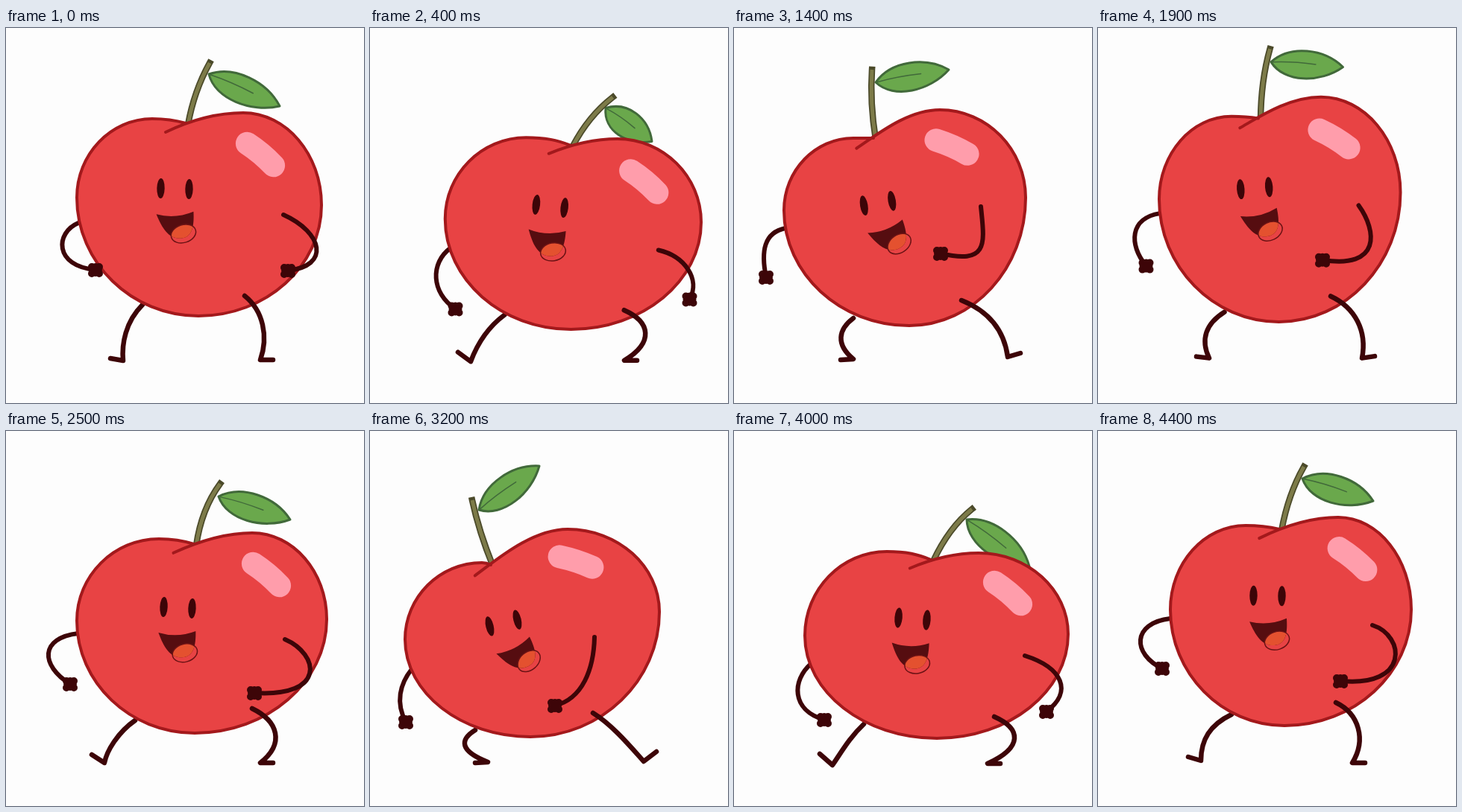
Recreate the animation shown at these times as an HTML page with a canvas. Size 480 px wide and 504 px high, loop 4500 ms.

```html
<!DOCTYPE html>
<html lang="en">
<head>
<meta charset="utf-8">
<title>Dancing apple</title>
<style>
html, body { margin: 0; width: 100%; height: 100%; overflow: hidden; background: #fdfdfd; }
canvas { display: block; width: 480px; height: 504px; }
</style>
</head>
<body>
<canvas id="stage" width="480" height="504"></canvas>
<script>
const ctx = document.getElementById('stage').getContext('2d');
const LOOP = 4500, STEP = 100;
const RED = '#e84344', EDGE = '#a3191c', LIMB = '#3d0508';

// body: notch, left top, left, bottom, right, right top
// stem: bend, tip; leaf: base, tip; face: eye centre and tilt in degrees
// limbs: bezier from body outwards; toes: lift of each toe
const hips = {
  body: [241,128, 196,122, 95,228, 258,387, 423,238, 318,114],
  stem: [252,85, 273,47], leaf: [272,62, 367,105], shine: [341,170], face: [226.5,216, 0],
  armL: [97,262, 66,275, 64,320, 120,325], armR: [372,251, 425,275, 435,320, 378,326],
  legL: [183,372, 160,395, 155,425, 157,447], legR: [320,360, 345,380, 352,415, 341,446], toes: [3, 0]
};
const farRight = {
  body: [277,166, 213,154, 102,262, 276,408, 452,268, 335,160],
  stem: [305,130, 342,108], leaf: [330,122, 381,172], shine: [376,218], face: [246.5,245.5, 10],
  armL: [112,310, 92,335, 94,375, 124,397], armR: [393,311, 425,317, 452,335, 463,374],
  legL: [181,387, 160,405, 145,430, 134,450], legR: [348,384, 385,400, 388,425, 341,447], toes: [15, 0]
};
const right = {
  body: [264,173, 205,162, 95,275, 272,413, 448,273, 328,164],
  stem: [288,130, 319,105], leaf: [312,119, 396,182], shine: [367,218], face: [239.5,252.5, 5],
  armL: [103,313, 78,335, 76,375, 121,388], armR: [390,302, 440,318, 455,350, 419,377],
  legL: [174,394, 155,412, 145,430, 132,449], legR: [349,384, 385,400, 388,425, 340,447], toes: [15, 0]
};
const lowBounce = {
  body: [252,152, 205,145, 95,255, 253,406, 430,253, 330,137],
  stem: [262,105, 287,71], leaf: [285,88, 381,119], shine: [349,193], face: [230.5,237.5, 2],
  armL: [97,272, 45,278, 46,315, 86,340], armR: [374,280, 420,300, 430,358, 333,352],
  legL: [173,389, 150,405, 135,430, 132,446], legR: [330,373, 365,390, 374,420, 341,446], toes: [11, 0]
};
const highBounce = {
  body: [243,132, 198,127, 97,240, 250,396, 420,240, 322,116],
  stem: [255,85, 276,48], leaf: [274,64, 369,94], shine: [341,172], face: [227.5,221.5, -1],
  armL: [97,252, 45,258, 46,300, 86,319], armR: [368,261, 412,275, 418,345, 325,336],
  legL: [179,381, 150,395, 138,415, 138,443], legR: [319,365, 350,380, 360,415, 341,446], toes: [5, 0]
};
const left = {
  body: [162,180, 150,177, 47,280, 215,411, 388,243, 265,132],
  stem: [146,135, 137,93], leaf: [146,106, 227,47], shine: [276,176], face: [179,258, -23],
  armL: [56,320, 40,340, 34,365, 48,391], armR: [301,277, 300,320, 285,360, 248,369],
  legL: [141,402, 120,415, 120,430, 158,445], legR: [299,379, 325,395, 350,425, 367,444], toes: [-1, 13]
};
const leftBounce = {
  body: [187,148, 160,148, 67,245, 235,400, 391,228, 276,110],
  stem: [182,100, 185,56], leaf: [190,73, 288,56], shine: [292,160], face: [193,235.5, -17],
  armL: [69,269, 40,275, 36,300, 43,335], armR: [331,240, 336,290, 342,318, 277,303],
  legL: [160,390, 140,405, 136,425, 160,445], legR: [305,366, 340,380, 362,405, 367,442], toes: [-1, 5]
};

function mix(a, b, k) {
  const out = {};
  for (const part in a) out[part] = a[part].map((v, i) => v + (b[part][i] - v) * k);
  return out;
}

// lengthen a pose upwards from the ground
function stretch(pose, k) {
  const out = {};
  for (const part in pose)
    out[part] = part === 'toes' ? pose[part] : pose[part].map((v, i) => i % 2 ? 450 + (v - 450) * k : v);
  return out;
}

const tall = stretch(mix(leftBounce, highBounce, 0.5), 1.06);

const keys = [
  [0, hips], [200, right], [300, farRight], [600, highBounce], [800, farRight], [1050, hips],
  [1300, left], [1400, leftBounce], [1500, leftBounce], [1700, left],
  [1900, tall], [2100, right], [2200, farRight], [2500, lowBounce], [2700, farRight], [2950, hips],
  [3200, left], [3300, leftBounce], [3400, leftBounce], [3600, left],
  [3800, tall], [4000, right], [4100, farRight], [4400, highBounce]
];

function poseAt(t) {
  let i = keys.findIndex(k => k[0] > t);
  if (i < 0) return keys[keys.length - 1][1];
  const [t0, a] = keys[i - 1], [t1, b] = keys[i];
  return mix(a, b, (1 - Math.cos(Math.PI * (t - t0) / (t1 - t0))) / 2);
}

function stroke(color, width, cap = 'round') {
  ctx.strokeStyle = color;
  ctx.lineWidth = width;
  ctx.lineCap = cap;
  ctx.lineJoin = 'round';
  ctx.stroke();
}

function fill(color) {
  ctx.fillStyle = color;
  ctx.fill();
}

function curve([x, y, ...rest]) {
  ctx.beginPath();
  ctx.moveTo(x, y);
  ctx.bezierCurveTo(...rest);
}

function hand(x, y) {
  ctx.beginPath();
  for (const [dx, dy, r] of [[0, 0, 9], [-5, -4, 5], [5, -4, 5], [-5, 5, 5], [5, 5, 5]]) {
    ctx.moveTo(x + dx + r, y + dy);
    ctx.arc(x + dx, y + dy, r, 0, 7);
  }
  fill(LIMB);
}

function leg(points, side, lift) {
  curve(points);
  ctx.lineTo(points[6] + 17 * side, points[7] - lift);
  stroke(LIMB, 6.5);
}

function leaf([x, y, tx, ty]) {
  const len = Math.hypot(tx - x, ty - y);
  ctx.save();
  ctx.translate(x, y);
  ctx.rotate(Math.atan2(ty - y, tx - x));
  ctx.beginPath();
  ctx.moveTo(0, 0);
  ctx.bezierCurveTo(len * 0.25, -25, len * 0.72, -23, len, 0);
  ctx.bezierCurveTo(len * 0.7, 24, len * 0.2, 27, 0, 0);
  fill('#6aa84c');
  stroke('#41693a', 3);
  ctx.beginPath();
  ctx.moveTo(2, 0);
  ctx.quadraticCurveTo(len * 0.3, -3, len * 0.62, -1);
  stroke('#41693a', 1.5);
  ctx.restore();
}

function stem(nx, ny, [bx, by, x, y]) {
  ctx.beginPath();
  ctx.moveTo(nx + 3, ny + 2);
  ctx.quadraticCurveTo(bx, by, x, y);
  stroke('#4b4a2a', 8.5, 'square');
  stroke('#7d7b49', 5, 'butt');
}

// quarter ellipse; flat = leaves horizontally
function quarter(x0, y0, x1, y1, flat) {
  const k = 0.55, dx = (x1 - x0) * k, dy = (y1 - y0) * k;
  if (flat) ctx.bezierCurveTo(x0 + dx, y0, x1, y1 - dy, x1, y1);
  else ctx.bezierCurveTo(x0, y0 + dy, x1 - dx, y1, x1, y1);
}

function body([nx, ny, ax, ay, lx, ly, bx, by, rx, ry, tx, ty], tilt) {
  const cx = nx - 27 - tilt * 0.25, cy = ny + 12 - tilt * 0.1;
  ctx.beginPath();
  ctx.moveTo(nx, ny);
  ctx.bezierCurveTo(nx + (ax - nx) * 0.3, ny + (ay - ny) * 0.65, ax + (nx - ax) * 0.45, ay, ax, ay);
  quarter(ax, ay, lx, ly, true);
  quarter(lx, ly, bx, by, false);
  quarter(bx, by, rx, ry, true);
  quarter(rx, ry, tx, ty, false);
  ctx.bezierCurveTo(tx + (cx - tx) * 0.4, ty, cx + 25, cy - 12 + tilt * 0.25, cx, cy);
  fill(RED);
  stroke(EDGE, 4);
}

function shine([x, y], tilt) {
  const a = (40 + Math.min(tilt, 0) * 0.95) * Math.PI / 180;
  const dx = 23 * Math.cos(a), dy = 23 * Math.sin(a);
  ctx.beginPath();
  ctx.moveTo(x - dx, y - dy);
  ctx.quadraticCurveTo(x + 2, y - 2, x + dx, y + dy);
  stroke('#ff9dab', 31);
}

function face([x, y, tilt]) {
  const rad = Math.PI / 180, a = tilt * rad;
  ctx.save();
  ctx.translate(x, y);
  ctx.rotate((tilt * 0.65 + 1.5) * rad);
  ctx.beginPath();
  ctx.ellipse(-19, 0, 5.2, 13.5, 0, 0, 7);
  ctx.ellipse(19, 0, 5.2, 13.5, 0, 0, 7);
  fill(LIMB);
  ctx.restore();

  ctx.save();
  ctx.translate(x - 33 * Math.sin(a), y + 33 * Math.cos(a));
  ctx.rotate(a - 3 * rad);
  ctx.beginPath();
  ctx.moveTo(-25, 0);
  ctx.quadraticCurveTo(0, 8, 25, -1);
  ctx.bezierCurveTo(25, 18, 22, 34, 6, 34);
  ctx.bezierCurveTo(-10, 34, -18, 20, -25, 0);
  ctx.closePath();
  fill('#560d10');
  ctx.save();
  ctx.clip();
  ctx.beginPath();
  ctx.ellipse(10, 28, 17, 12, -0.25, 0, 7);
  fill('#e4512f');
  ctx.restore();
  stroke('#6b1214', 1.5);
  ctx.restore();
}

function draw(p) {
  const tilt = p.face[2];
  ctx.fillStyle = '#fdfdfd';
  ctx.fillRect(0, 0, 480, 504);
  curve(p.armL);
  stroke(LIMB, 6);
  leg(p.legL, -1, p.toes[0]);
  leaf(p.leaf);
  stem(p.body[0], p.body[1], p.stem);
  body(p.body, tilt);
  shine(p.shine, tilt);
  face(p.face);
  hand(p.armL[6], p.armL[7]);
  leg(p.legR, 1, p.toes[1]);
  curve(p.armR);
  stroke(LIMB, 6);
  hand(p.armR[6], p.armR[7]);
}

const start = performance.now();
function tick() {
  const t = (performance.now() - start) % LOOP;
  draw(poseAt(Math.floor(t / STEP) * STEP));
  requestAnimationFrame(tick);
}
tick();
</script>
</body>
</html>
```
